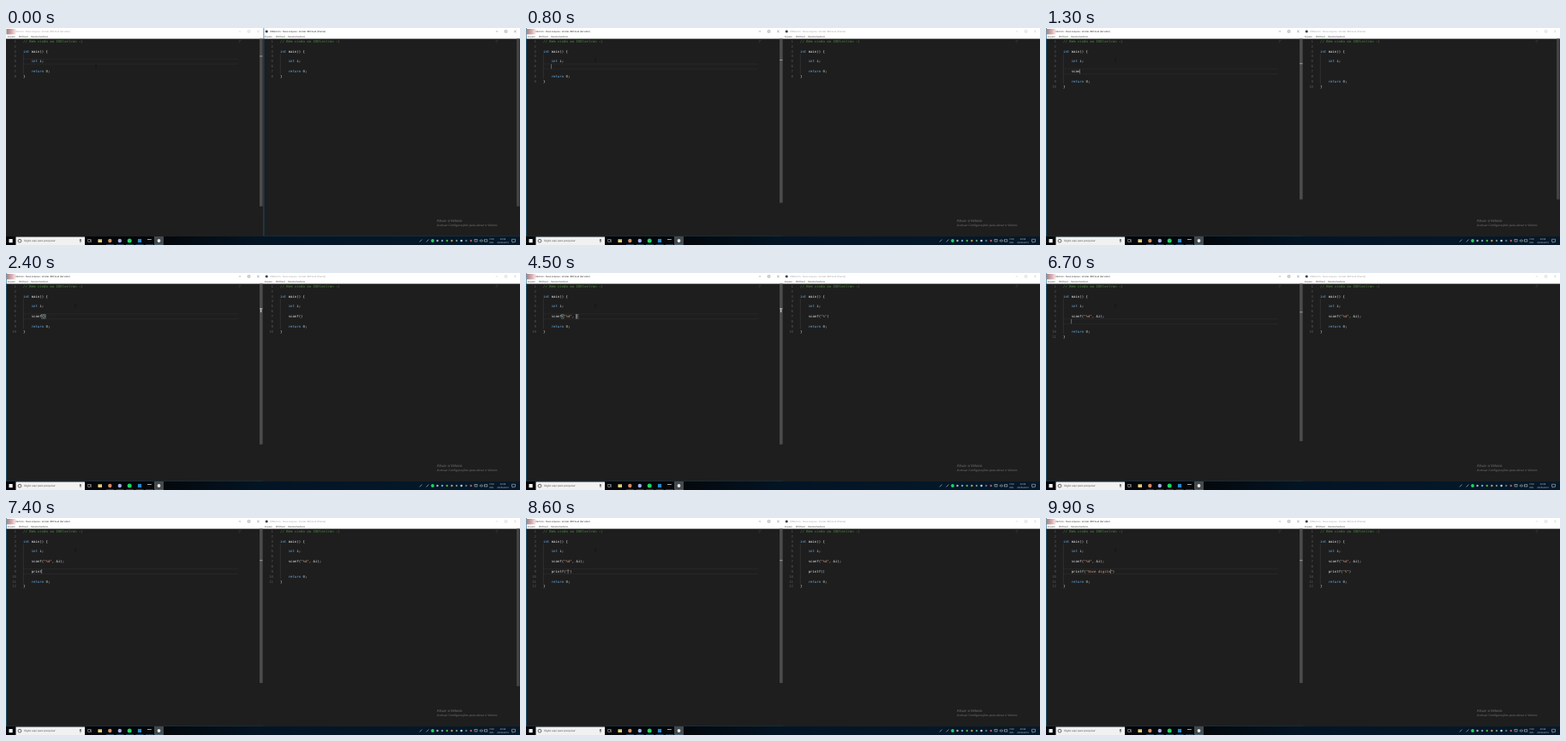
An HTML page for the animation above (10000 ms loop, 600 by 254 pixels).

```html
<!DOCTYPE html>
<html lang="pt-BR">
<head>
<meta charset="utf-8">
<title>Editor sincronizado</title>
<style>
html, body { margin: 0; width: 100%; height: 100%; overflow: hidden; background: #1e1e1e; }
svg { display: block; width: 600px; height: 254px; }
text { font-family: "Open Sans", "Noto Sans", sans-serif; text-rendering: geometricPrecision; white-space: pre; }
.code text { font: 4px "DejaVu Sans Mono", "Liberation Mono", monospace; fill: #e6e6e6; }
.code .num { fill: #5a5a5a; text-anchor: end; }
.com { fill: #4f8a40; }
.key { fill: #6cb4ea; }
.str { fill: #d9a084; }
.lit { fill: #c4dab4; }
.ui { font-size: 2.5px; fill: #222; }
.mark { fill: #777; }
.bar { font-size: 2.5px; fill: #ddd; text-anchor: middle; }
</style>
</head>
<body>
<svg viewBox="0 0 600 254">
  <defs>
    <linearGradient id="smudge">
      <stop offset="0" stop-color="#948888"/>
      <stop offset=".5" stop-color="#d8a4a9"/>
      <stop offset="1" stop-color="#f4ecec"/>
    </linearGradient>
    <linearGradient id="night">
      <stop offset=".28" stop-color="#040609"/>
      <stop offset=".5" stop-color="#031525"/>
      <stop offset="1" stop-color="#06192a"/>
    </linearGradient>
    <filter id="soft"><feGaussianBlur stdDeviation=".6"/></filter>
  </defs>
  <rect width="600" height="254" fill="#1e1e1e"/>
  <g id="frames"></g>
  <rect x=".5" y="1" width="11" height="6.5" fill="url(#smudge)" filter="url(#soft)"/>
  <g id="left" class="code"></g>
  <g id="right" class="code" transform="translate(300)"></g>
  <path id="mouse" d="M-.6-1.8H.6M0-1.8V1.8M-.6 1.8H.6" stroke="#0c0c0c" stroke-width=".4"/>
  <text x="503" y="227" class="mark" font-size="4.2">Ativar o Velioro</text>
  <text x="503" y="231.7" class="mark" font-size="3.5">Acessar Configurações para ativar o Velioro.</text>
  <g id="taskbar"></g>
</svg>
<script>
const LOOP = 10000, CH = 2.408, LH = 5.87, TOP = 12.6, VIEW = 231, X0 = 20;
const $ = id => document.getElementById(id);
const rect = (x, y, w, h, fill, more = '') =>
  `<rect x="${x}" y="${y}" width="${w}" height="${h}" fill="${fill}" ${more}/>`;
const disc = (x, y, r, fill, more = '') => `<circle cx="${x}" cy="${y}" r="${r}" fill="${fill}" ${more}/>`;
const line = (d, color, w = .5) => `<path d="${d}" fill="none" stroke="${color}" stroke-width="${w}"/>`;
const label = (x, y, s, cls, more = '') => `<text x="${x}" y="${y}" class="${cls}" ${more}>${s}</text>`;
const esc = s => s.replace(/&/g, '&amp;').replace(/</g, '&lt;');

// Lines after the opening brace; the bar marks the caret
const one = 'int i;\n\n';
const two = one + 'scanf("%d", &i);\n\n';
const typing = [[0, 'int i;|'], [800, 'int i;\n|'], [1000, one + '|']];
const type = (t, s, head) => typing.push([t, head + s]);
const spell = (start, word, head, tail = '') =>
  [...word].forEach((c, i) => type(start + i * 100, word.slice(0, i + 1) + '|' + tail, head));
type(1100, 's|', one);
type(1200, 'sc|', one);
type(1300, 'scan|', one);
type(1400, 'scanf|', one);
type(1500, 'scanf(|)', one);
type(2800, 'scanf("|")', one);
type(3200, 'scanf("%|")', one);
type(3300, 'scanf("%d|")', one);
type(3500, 'scanf("%d"|)', one);
type(4000, 'scanf("%d",|)', one);
type(4100, 'scanf("%d", |)', one);
type(4700, 'scanf("%d", &|)', one);
type(5000, 'scanf("%d", &i|)', one);
type(6400, 'scanf("%d", &i)|', one);
type(6500, 'scanf("%d", &i);|', one);
type(6700, 'scanf("%d", &i);\n|', one);
type(6900, '|', two);
spell(7000, 'print', two);
type(7600, 'printf|', two);
type(7900, 'printf(|)', two);
type(8600, 'printf("|")', two);
spell(9000, 'Voce dig', two + 'printf("', '")');
type(9800, 'Voce digit|")', two + 'printf("');
type(9900, 'Voce digito|")', two + 'printf("');

// The second editor receives its copies late
const synced = [
  [0, 'int i;'], [1000, 'int i;\n'], [1300, one], [1500, one + 's'], [2000, one + 'scanf'],
  [2400, one + 'scanf()'], [3000, one + 'scanf("")'], [3500, one + 'scanf("%")'],
  [4600, one + 'scanf("%d")'], [4800, one + 'scanf("%d", )'], [5700, one + 'scanf("%d", &i)'],
  [6700, one + 'scanf("%d", &i);'], [7000, two.slice(0, -1)],
  [7700, two + 'print'], [8200, two + 'printf()'], [8800, two + 'printf("")'], [9300, two + 'printf("V")']
];
const at = (list, t) => list.findLastIndex(step => step[0] <= t);

const rule = /(\/\/.*)|("[^"]*"?)|\b(int|return)\b|\b(\d+)\b/g;
const paint = s => {
  let out = '', last = 0;
  for (const m of s.matchAll(rule)) {
    const cls = ['com', 'str', 'key', 'lit'][m.slice(1).findIndex(Boolean)];
    out += esc(s.slice(last, m.index)) + `<tspan class="${cls}">${esc(m[0])}</tspan>`;
    last = m.index + m[0].length;
  }
  return out + esc(s.slice(last));
};

const baseline = row => 16.8 + (row - 1) * LH;
const rowTop = row => baseline(row) - 4.1;
const total = n => VIEW + (n - 1) * LH;
const sliderSize = n => VIEW * VIEW / total(n);

function source(body) {
  const inner = [...body.split('\n'), '', 'return 0;'].map(s => s && '    ' + s);
  return ['// Bem vindo ao IDElectron :)', '', 'int main() {', '', ...inner, '}'];
}

function editor(lines) {
  let out = line(`M${X0 + .3} ${rowTop(4)}V${rowTop(lines.length)}`, '#404040');
  lines.forEach((s, i) => {
    out += label(12, baseline(i + 1), i + 1, 'num');
    if (!s) return;
    // Leading blanks become an offset
    const pad = s.length - s.trimStart().length;
    out += label(X0 + pad * CH, baseline(i + 1), paint(s.trimStart()), '');
  });
  return out + rect(271.5, 14.5, 3, .6, '#344c2e') + rect(271.5, 15.7, 1.5, .5, '#3c3c3c') +
    rect(272, 16.8, 1.4, .5, '#3c3c3c');
}

const touches = step => /[()]\||\|[()]/.test(step[1]);

function leftPane(t) {
  const i = at(typing, t), [since, text] = typing[i];
  const lines = source(text.replace('|', ''));
  const before = text.split('|')[0].split('\n');
  const row = before.length + 4, col = before.at(-1).length + 4;
  const x = X0 + col * CH, y = rowTop(row), n = lines.length;
  const markY = TOP + (row - 1) * LH * VIEW / total(n);

  let out = line(`M20 ${y}H271M20 ${y + LH}H271`, '#2c2c2c', .7);
  out += rect(296, TOP, 3.6, sliderSize(n), '#4c4c4c');
  out += rect(296, markY, 3.6, .9, '#a0a0a0');

  // Bracket pairs light up shortly after the caret reaches them
  if (touches(typing[i]) && (t - since >= 200 || touches(typing[i - 1]))) {
    const full = lines[row - 1];
    for (const c of [full.indexOf('('), full.lastIndexOf(')')])
      out += rect(X0 + c * CH, y + .4, CH, LH - .8, '#20352a', 'stroke="#888" stroke-width=".4"');
    out += rect(296.8, markY, 1.6, 4.8, '#b5b5b5');
  }
  out += editor(lines);
  if (t >= 200 && (t - since) % 1000 < 500) out += rect(x - .1, y + .3, .5, LH - .6, '#aeafad');
  if (t >= 5000 && t < 5900) out += popup(63, y + LH);
  return out;
}

function popup(x, y) {
  const icon = dy => rect(x + 1.6, y + dy, 3.2, 2.6, 'none', 'stroke="#b8c4cc" stroke-width=".5"') +
    line(`M${x + 2.4} ${y + dy + 1.3}h1.6`, '#b8c4cc');
  return rect(x, y, 133, 12.4, '#252526', 'stroke="#454545" stroke-width=".4"') +
    rect(x, y, 133, 6.2, '#073655') + icon(1.8) + icon(8) +
    label(x + 7, y + 4.5, '<tspan fill="#2fa3ff">i</tspan>nt', '') +
    label(x + 7, y + 10.7, '<tspan fill="#2fa3ff">I</tspan>DElectron', '');
}

function rightPane(t) {
  const i = at(synced, t), lines = source(synced[i][1]);
  const count = step => step[1].split('\n').length;
  const grown = synced.find(step => count(step) === count(synced[i]))[0];
  // The slider shows when lines are added, then fades
  const alpha = Math.min(1, Math.max(0, (800 - t + grown) / 300));
  return line('M596 12.6V243', '#2c2c2c') +
    rect(296, TOP, 3.6, sliderSize(lines.length), '#434343', `opacity="${alpha.toFixed(2)}"`) + editor(lines);
}

function frame(x, role, active) {
  const ink = active ? '#111' : '#999';
  const edge = active ? line(`M${x ? .9 : .4} 0V243.5`, '#1a658f', .7) + line('M0 243.4H300', '#16384c') : '';
  return `<g transform="translate(${x})">` + rect(0, 0, 300, TOP, '#fff') +
    (x ? disc(4.2, 4, 1.6, '#3c4650') : '') +
    label(8, 4.9, `IDElectron - Novo Arquivo - Versão IDECloud (${role})`, 'ui',
      `style="font-size:2.65px;fill:${ink}"`) +
    label(1.8, 10.9, 'Arquivo', 'ui') + label(14.8, 10.9, 'IDECloud', 'ui') +
    label(29, 10.9, 'Desenvolvedores', 'ui') +
    line('M271.8 4h2.4M282.4 2.8h2.4v2.4h-2.4zM293.2 2.8l2.4 2.4M295.6 2.8l-2.4 2.4', ink, .3) +
    edge + '</g>';
}

function taskbar() {
  const dark = '#333', pale = '#d8d8d8';
  let out = rect(0, 244, 600, 10, 'url(#night)') + rect(3.5, 247, 4.2, 4.2, '#f4f4f4') +
    rect(11.5, 244.5, 80.5, 9.5, '#f1f1f1') +
    disc(16, 249.2, 1.9, 'none', `stroke="${dark}" stroke-width=".7"`) +
    label(21.2, 250.3, 'Digite aqui para pesquisar', 'ui', 'style="font-size:3px;fill:#444"') +
    rect(86.3, 247, 1.2, 2.6, dark, 'rx=".6"') + line('M85.7 249q1.2 2.2 2.4 0M86.9 250v1.4', dark, .4);
  out += rect(95.8, 247.5, 2.4, 3.2, 'none', `stroke="${pale}" stroke-width=".5"`) +
    line('M99.3 247.3v3.6', pale) + rect(107.4, 247.3, 4.6, 3.7, '#e3cd7c') +
    disc(121.3, 249, 2.2, '#d68c5e') + disc(132.8, 249, 2.2, '#9fb0e6') +
    disc(144.2, 249, 2.5, '#1ed760') + rect(153.9, 246.9, 4.2, 4.2, '#2489ca') +
    rect(165, 247, 4.8, 4, '#0a0a0a') + rect(165, 247, 4.8, .8, '#ccc') +
    rect(173, 244, 11, 10, '#454a4d') + disc(178.5, 249, 1.9, '#e4e8ea');
  for (const x of [117, 128.5, 140, 151.5, 163, 174]) out += rect(x, 253.5, 9, .5, '#4f7fa5');
  out += line('M482.8 250.4l2.8-2.8M490.6 250.4l2.8-2.8', '#a9c4d8', .7);
  ['#1ed760', '#a8b4bc', '#7aa0c0', '#46b648', '#d08f4a', '#5f8f7f', '#c8dcea', '#55708a', '#c05858']
    .forEach((c, i) => out += disc(498 + i * 5.6, 249, i ? 1.2 : 1.9, c));
  out += rect(547, 247.7, 3, 2.3, 'none', `stroke="${pale}" stroke-width=".5"`) +
    line('M553 248.4h1l1.2-1v3.2l-1.2-1h-1zM556.3 248q.8 1 0 2', pale, .4) +
    rect(558.7, 247.8, 3.2, 2.2, 'none', `stroke="${pale}" stroke-width=".5"`) +
    label(567, 248.1, 'POR', 'bar') + label(567, 252.2, 'INTL', 'bar') +
    label(580, 248.1, '00:08', 'bar') + label(580, 252.2, '23/05/2019', 'bar') +
    line('M590.5 247.3h4v3h-1.6l-1 1v-1h-1.4z', pale);
  return out;
}

const shown = {};
function put(id, html) {
  if (shown[id] !== html) $(id).innerHTML = shown[id] = html;
}

function draw() {
  const t = performance.now() % LOOP, focus = t >= 200;
  const k = Math.min(1, Math.max(0, (t - 100) / 200));
  put('frames', frame(0, 'Servidor', focus) + frame(300, 'Cliente', !focus));
  put('left', leftPane(t));
  put('right', rightPane(t));
  $('mouse').setAttribute('transform', `translate(${105 - 24 * k} ${45 - 7 * k})`);
  requestAnimationFrame(draw);
}
put('taskbar', taskbar());
draw();
</script>
</body>
</html>
```
